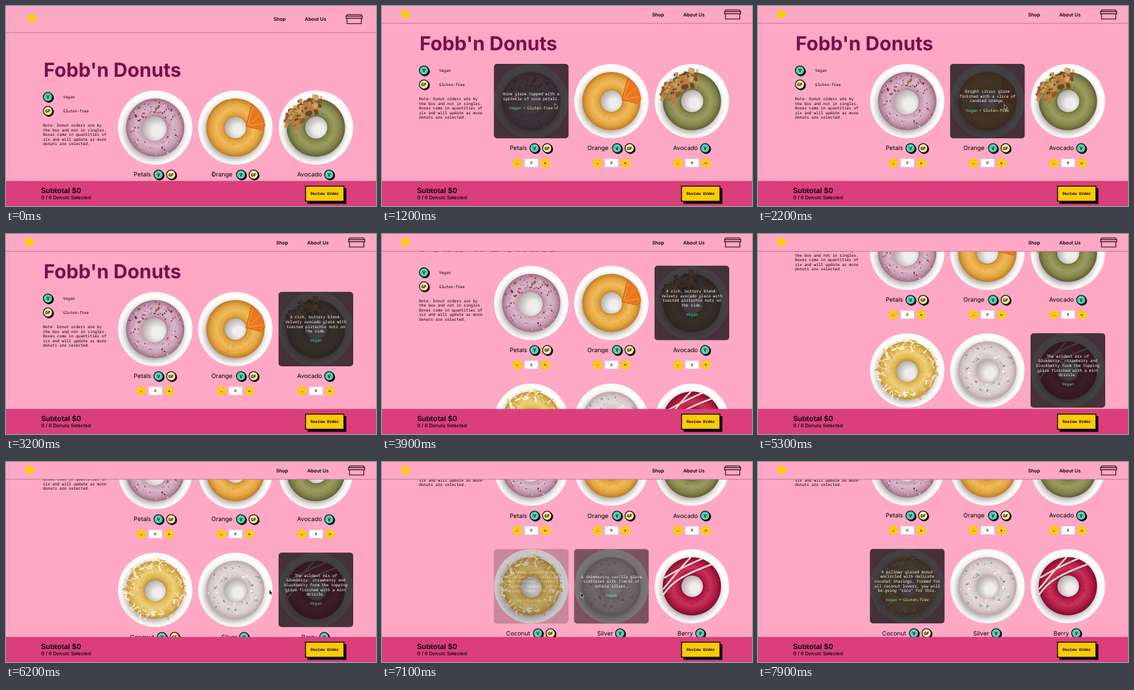
Recreate the animation shown at these times as an HTML page. Size 600x325 px, loop 8000 ms.

```html
<!DOCTYPE html>
<html lang="en">
<head>
<meta charset="utf-8">
<title>Donut shop</title>
<style>
  html, body { margin: 0; width: 100%; height: 100%; overflow: hidden; background: #fea8c5; }
  svg { display: block; width: 100%; height: 100%; }
  text { font-family: Inter, "Open Sans", sans-serif; text-rendering: geometricPrecision; white-space: pre; }
  .mono { font-family: "Noto Sans Mono", "DejaVu Sans Mono", monospace; }
</style>
</head>
<body>
<svg id="stage" viewBox="0 0 600 325" preserveAspectRatio="none"></svg>
<script>
const LOOP = 8000;
const PINK = '#fea8c5', TEAL = '#50cfb1', CREAM = '#f8eaa6', YELLOW = '#fdcb05', INK = '#0d0708';
const MONO = 6.35, LINE = 7.6;

let seed = 11;
const rnd = () => (seed = (seed * 16807) % 2147483647) / 2147483647;
const pick = list => list[Math.floor(rnd() * list.length)];
const times = (n, f) => Array.from({ length: n }, (_, i) => f(i)).join('');

// y is the vertical middle of the capitals
const text = (x, y, s, size, extra = '') =>
  `<text x="${x}" y="${y + size * 0.36}" font-size="${size}" ${extra}>${s}</text>`;
const mono = (x, y, s, extra = '') => text(x, y, s, MONO, `class="mono" font-weight="500" ${extra}`);
const circle = (x, y, r, fill, extra = '') =>
  `<circle cx="${x}" cy="${y}" r="${r}" fill="${fill}" ${extra}/>`;
const rect = (x, y, w, h, fill, extra = '') =>
  `<rect x="${x}" y="${y}" width="${w}" height="${h}" fill="${fill}" ${extra}/>`;
const MID = 'text-anchor="middle"';

function badge(x, y, kind) {
  return circle(x + 1.6, y + 1.4, 8, INK) +
    circle(x, y, 7.4, kind === 'V' ? TEAL : CREAM, `stroke="${INK}" stroke-width="1.3"`) +
    text(x, y, kind, 7, `class="mono" font-weight="700" ${MID}`);
}

function stepper(x, y) {
  const knob = (kx, s) => circle(kx, y, 7.6, YELLOW) + text(kx, y, s, 7, `class="mono" font-weight="700" ${MID}`);
  return knob(x - 22.5, '-') + knob(x + 22.7, '+') +
    rect(x - 11, y - 7, 22.5, 14, '#fffdfd', 'rx="1.5" stroke="#dba3b6" stroke-width=".6"') +
    text(x, y, '0', 6, `class="mono" ${MID}`);
}

// Small bits thrown over part of the ring; angles in degrees
function scatter(n, r0, r1, a0, a1, w, h, colors, alpha = 1) {
  return times(n, () => {
    const a = (a0 + (a1 - a0) * rnd()) * Math.PI / 180, r = r0 + (r1 - r0) * rnd();
    const k = 0.55 + rnd() * 0.9, x = (Math.cos(a) * r).toFixed(1), y = (Math.sin(a) * r).toFixed(1);
    return `<rect x="${-w * k / 2}" y="${-h * k / 2}" width="${w * k}" height="${h * k}" rx="${h * k * 0.35}"
      fill="${pick(colors)}" opacity="${alpha}" transform="translate(${x} ${y}) rotate(${Math.floor(rnd() * 180)})"/>`;
  });
}

const orangeSlice = `<path d="M17-2L26-37Q45-29 48-3L42 4Z" fill="#e9781c" stroke="#c65d12" stroke-width=".8"/>
  <path d="M20-5L28-32M21-4L40-22M22-3L45-7" stroke="#f6a651" stroke-width="1" fill="none"/>`;
const drizzle = `<g fill="none" stroke="#f3e2d2" stroke-width="2.6" stroke-linecap="round">
  <path d="M-46 13C-34-4-22-16 33-36"/><path d="M-44-14C-28-24-8-34 17-45"/><path d="M-46 4C-34-10-24-24-2-47"/></g>`;

const items = [
  { name: 'Petals', x: 242, row: 0, label: 207, tags: [247.3, 267.8], hole: [-1.5, 1.5, 20],
    tone: ['#9d6d86', '#c59caf', '#d9b9c7'],
    top: () => scatter(95, 22, 46, 0, 360, 2.6, 1.7, ['#9c2f6b', '#b9558b', '#8b2a52', '#d68fb2', '#e5c3d2']) +
      scatter(12, 24, 45, 180, 330, 4.6, 2.6, ['#8c4a45', '#7b3148', '#94684e']),
    lines: ['Wine glaze topped with a', 'sprinkle of rose petals.'] },
  { name: 'Orange', x: 372, row: 0, label: 333, tags: [381, 401.5], hole: [0, 0, 17.5],
    tone: ['#bd7d22', '#e2a440', '#f0bb5c'], top: () => orangeSlice,
    lines: ['Bright citrus glaze', 'finished with a slice of', 'candied orange.'] },
  { name: 'Avocado', x: 502.5, row: 0, label: 472, tags: [524], hole: [.5, 0, 18],
    tone: ['#5e6034', '#85864b', '#9d9b60'],
    top: () => scatter(85, 24, 51, 178, 281, 7, 5, ['#b97b3f', '#8c5728', '#d6a466', '#704722', '#c58f4e']),
    lines: ['A rich, buttery blend:', 'Velvety avocado glaze with', 'toasted pistachio nuts on', 'the side.'] },
  { name: 'Coconut', x: 242, row: 1, label: 201, tags: [252.8, 273.3], hole: [0, 1.5, 17],
    tone: ['#bd9138', '#dfb853', '#eed07a'],
    top: () => scatter(150, 35, 50, 0, 360, 7, 2, ['#f5e3ba', '#e7c482', '#fff4da', '#d8a95b', '#f0d49c']),
    lines: ['A pillowy glazed donut', 'encircled with delicate', 'coconut shavings. Formed for',
      'all coconut lovers, you will', 'be going “coco” for this.'] },
  { name: 'Silver', x: 372, row: 1, label: 349, tags: [386], hole: [0, 1, 18],
    tone: ['#b9a5a6', '#d8c9c9', '#e5d9d9'],
    top: () => scatter(75, 22, 45, 0, 360, 3, 2, ['#9caab8', '#f6f8fb', '#8894a3', '#c3cdd6']),
    lines: ['A shimmering vanilla glaze', 'scattered with flakes of', 'edible silver.'] },
  { name: 'Berry', x: 502.5, row: 1, label: 479, tags: [516], hole: [.5, 0, 17.5],
    tone: ['#7f0d30', '#b01a44', '#c93259'], top: () => drizzle,
    lines: ['The wildest mix of', 'blueberry, strawberry and', 'blackberry form the topping',
      'glaze finished with a mint', 'drizzle.'] }
];
const ROW_Y = [197.5, 388.7];

function glaze({ tone: [edge, base, light] }, i) {
  const stops = [[.34, edge], [.46, base], [.64, light], [.84, base], [1, edge]];
  return `<radialGradient id="g${i}">` +
    stops.map(([o, c]) => `<stop offset="${o}" stop-color="${c}"/>`).join('') + '</radialGradient>';
}

function donut(item, i) {
  const [hx, hy, hr] = item.hole, [edge, , light] = item.tone;
  return circle(0, 0, 60.3, '#fdfcfb') + circle(-2, 4, 56, 'url(#shade)') +
    circle(0, 0, 47.3, `url(#g${i})`) +
    scatter(70, 21, 45, 0, 360, 2.2, 1.6, [edge, light], .3) +
    circle(hx, hy, hr, 'url(#hole)') + item.top();
}

function overlay(item, i) {
  const rows = item.lines.length + 2;
  const y = k => (k - (rows - 1) / 2) * LINE - .4;
  const tag = `<tspan fill="#5fdcbc">Vegan</tspan>` +
    (item.tags[1] ? `<tspan dx="-1"> + </tspan><tspan dx="-1" fill="${CREAM}">Gluten-free</tspan>` : '');
  return `<g id="o${i}" opacity="0" fill="#fff">` +
    rect(-60.5, -60.5, 121, 121, 'rgb(32,26,29)', 'rx="5" fill-opacity=".83"') +
    item.lines.map((s, k) => mono(0, y(k), s, MID)).join('') + mono(0, y(rows - 1), tag, MID) + '</g>';
}

function card(item, i) {
  const y = ROW_Y[item.row];
  return `<g transform="translate(${item.x} ${y})">${donut(item, i)}${overlay(item, i)}</g>` +
    text(item.label, y + 76.4, item.name, 9.8) +
    item.tags.map((x, k) => badge(x, y + 76.5, k ? 'GF' : 'V')).join('') +
    stepper(item.x, y + 100.5);
}

const note = ['Note: Donut orders are by', 'the box and not in singles.', 'Boxes come in quantities of',
  'six and will update as more', 'donuts are selected.'];

document.getElementById('stage').innerHTML = `
  <defs>
    ${items.map(glaze).join('')}
    <radialGradient id="shade"><stop offset=".8" stop-color="#8d8385" stop-opacity=".55"/>
      <stop offset="1" stop-color="#cfc8c8" stop-opacity="0"/></radialGradient>
    <radialGradient id="hole" cx=".62" cy=".6" r=".7"><stop offset=".3" stop-color="#f0eeed"/>
      <stop offset="1" stop-color="#aaa2a1"/></radialGradient>
  </defs>
  ${rect(0, 0, 600, 325, PINK)}
  <g id="page">
    ${text(61, 103.3, "Fobb'n Donuts", 31.4, 'font-weight="700" fill="#790f48"')}
    ${badge(68, 147.8, 'V')}${mono(92.5, 148, 'Vegan')}
    ${badge(68, 170.5, 'GF')}${mono(92.5, 171, 'Gluten-free')}
    ${note.map((s, k) => mono(60, 193.8 + k * 7.5, s)).join('')}
    ${items.map(card).join('')}
  </g>
  <g id="header">
    ${rect(0, -20, 600, 63, PINK)}${rect(0, 42.6, 600, 1, '#b27a90')}
  </g>
  <g id="logo">${circle(42, 20, 7, YELLOW)}</g>
  <g id="nav">
    ${text(434, 21.5, 'Shop', 7.8, 'font-weight="600"')}
    ${text(484.5, 21.5, 'About Us', 7.8, 'font-weight="600"')}
    <path d="M551.5 16.5L553.5 13.8H575.5L577.7 16.5V20H551.5ZM551.5 16.5H577.7M553 20V28.6H576.3V20"
      fill="none" stroke="#3a1623" stroke-width="1.3"/>
  </g>
  ${rect(0, 284.3, 600, 41, '#da3f7b')}
  ${text(57, 300, 'Subtotal $0', 11.6, 'font-weight="600"')}
  ${text(57, 311.5, '0 / 6 Donuts Selected', 7.85, 'font-weight="500"')}
  ${rect(489, 296, 63, 25.5, INK)}
  ${rect(485.7, 292.7, 62.3, 24.6, YELLOW, `stroke="${INK}" stroke-width="1.5"`)}
  ${text(516.8, 304.8, 'Review Order', MONO, `class="mono" font-weight="700" ${MID}`)}
  <g id="cursor">
    <path id="arrow" d="M0-3.5V4.6L1.9 3L3.2 5.8L4.5 5.2L3.3 2.5H5.6Z" fill="#111" stroke="#fff" stroke-width=".6"/>
    <path id="beam" d="M-1.6-4Q0-4 0-3Q0-4 1.6-4M0-3V3M-1.6 4Q0 4 0 3Q0 4 1.6 4M-1 1.2H1"
      fill="none" stroke="#333" stroke-width=".8"/>
  </g>`;

// Tables of [time, value...]
const scrollKeys = [[0, 0], [100, 0], [800, 43], [3400, 43], [4250, 110], [4400, 110], [5200, 167],
  [5400, 167], [6100, 181], [6400, 181], [7200, 187]];
const shrinkKeys = [[100, 0], [400, 1]];
const cursorKeys = [[100, 336, 273], [850, 282, 168], [1200, 280, 162], [1500, 280, 162], [1950, 398, 165],
  [2350, 400, 163], [2800, 488, 158], [3300, 488, 158], [4300, 489, 160], [4500, 489, 160],
  [5200, 499, 207], [5700, 499, 207], [6200, 427, 211], [6650, 350, 214], [6900, 345, 215], [7400, 281, 217]];
const hovers = [[800, 1720], [1720, 2540], [2540, 4700], [7050, 8200], [6250, 7050], [4750, 6250]];
const FADE = 180;

const clamp = v => Math.min(1, Math.max(0, v));
const ease = p => p * p * (3 - 2 * p);
function at(keys, t, col = 1) {
  const i = keys.findIndex(k => k[0] > t);
  if (i === 0) return keys[0][col];
  if (i < 0) return keys[keys.length - 1][col];
  const a = keys[i - 1], b = keys[i];
  return a[col] + (b[col] - a[col]) * ease((t - a[0]) / (b[0] - a[0]));
}

const el = id => document.getElementById(id);
const move = (id, x, y) => el(id).setAttribute('transform', `translate(${x.toFixed(2)} ${y.toFixed(2)})`);

function draw(t) {
  const s = at(shrinkKeys, t);
  move('page', 0, -at(scrollKeys, t));
  move('header', 0, -15 * s);
  move('logo', -3.8 * s, -7 * s);
  move('nav', 4 * s, -7.5 * s);
  hovers.forEach(([from, to], i) =>
    el('o' + i).setAttribute('opacity', Math.min(clamp((t - from) / FADE), clamp(1 - (t - to) / FADE))));
  move('cursor', at(cursorKeys, t, 1), at(cursorKeys, t, 2));
  const arrow = (t > 200 && t < 2600) || (t > 5750 && t < 7350);
  el('arrow').setAttribute('visibility', arrow ? 'visible' : 'hidden');
  el('beam').setAttribute('visibility', arrow ? 'hidden' : 'visible');
}

const start = performance.now();
function tick() {
  draw((performance.now() - start) % LOOP);
  requestAnimationFrame(tick);
}
tick();
</script>
</body>
</html>
```
